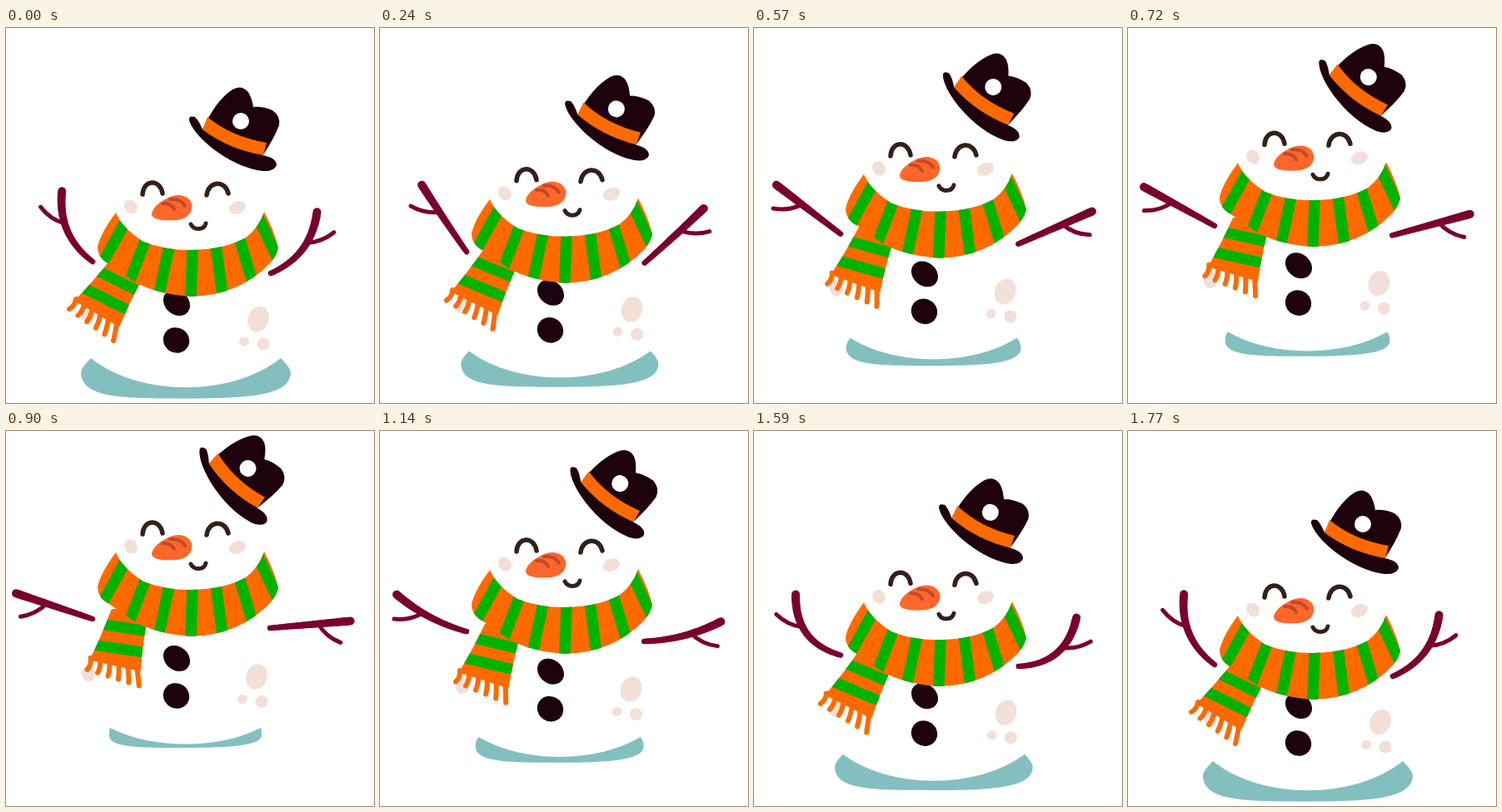
These frames come from a looping animation (442 by 451 pixels, 1.8 s). An HTML page with a canvas:

```html
<!DOCTYPE html>
<html lang="en">
<head>
<meta charset="utf-8">
<title>Snowman</title>
<style>
html, body { margin: 0; width: 100%; height: 100%; overflow: hidden; background: #fff; }
canvas { display: block; }
</style>
</head>
<body>
<canvas id="stage" width="442" height="451"></canvas>
<script>
const ctx = document.getElementById('stage').getContext('2d');
const LOOP = 1800, STEP = 30, RISE = 60, TOP = 900, LAND = 1770;
const ORANGE = '#ff6a00', GREEN = '#00b300', DARK = '#1e020d', BLUSH = '#f1dfd8',
      LINE = '#33201a', TWIG = '#7a002f', ICE = '#84bfc0', NOSE = '#ff672a', CREASE = '#c5482b';

const scarf = new Path2D(`M132 222 Q139 240 165 257 Q190 267 222 267 Q264 266 288 252
  Q304 240 310 221 Q323 246 327 264 Q326 272 318 282 Q280 322 222 323 Q180 320 154 305
  L124 284 Q110 277 110 263 Q114 246 132 222Z`);
const tail = new Path2D('M126 278 L170 290 Q152 322 136 360 L82 328 Q102 308 126 278Z');
const brim = new Path2D(`M220 111 Q219 105 227 107 Q232 112 236 122 Q268 146 308 153
  Q325 156 325 165 Q322 173 308 172 Q278 168 247 144 Q224 125 220 111Z`);
const crown = new Path2D(`M236 122 Q252 87 272 74 Q282 68 290 76 Q295 82 297 95
  Q308 94 320 99 Q330 106 328 117 Q322 133 308 154 Q268 146 236 122Z`);
const band = new Path2D('M242 107 Q271 131 313 138 L309 153 Q268 146 236 122Z');
const nose = new Path2D('M175 224 Q176 214 193 205 C208 197 222 202 223.5 214 Q223 228 206 231 Q176 233 175 224Z');

const lerp = (a, b, k) => a + (b - a) * k;
const radians = degrees => degrees * Math.PI / 180;

function fill(path, color) {
  ctx.fillStyle = color;
  ctx.fill(path);
}

function stroke(d, color, width) {
  ctx.strokeStyle = color;
  ctx.lineWidth = width;
  ctx.stroke(new Path2D(d));
}

function oval(x, y, rx, ry, color, tilt = 0) {
  ctx.fillStyle = color;
  ctx.beginPath();
  ctx.ellipse(x, y, rx, ry, tilt, 0, 7);
  ctx.fill();
}

function isolated(draw) {
  ctx.save();
  draw();
  ctx.restore();
}

function shifted(dy, draw) {
  isolated(() => {
    ctx.translate(0, dy);
    draw();
  });
}

function spin(x, y, degrees) {
  ctx.translate(x, y);
  ctx.rotate(radians(degrees));
  ctx.translate(-x, -y);
}

function ice(p) {
  const l = 90 + 34 * p, r = 342 - 35 * p, w = r - l, mid = (l + r) / 2;
  const lip = 12 - 11 * p, y = 397 - 40 * p;
  const side = y + 17 - 8 * p, low = y + 48.5 - 24.5 * p, dip = y + 47 - 21 * p;
  fill(new Path2D(`M${l + lip} ${y} Q${l} ${y + lip} ${l} ${side}
    C${l} ${low} ${l + 0.2 * w} ${low} ${mid} ${low}
    C${r - 0.2 * w} ${low} ${r} ${low - 3} ${r} ${side}
    Q${r} ${y + lip} ${r - lip} ${y}
    C${r - 0.28 * w} ${dip} ${l + 0.28 * w} ${dip} ${l + lip} ${y}Z`), ICE);
}

// Drawn upright from the shoulder, then leaned outwards; side is -1 (left) or 1.
function arm(x, y, side, lean, bend) {
  const length = 97 - 0.18 * bend, fork = radians(45 - 0.5 * bend);
  const at = k => [2 * k * (1 - k) * bend, -k * length];
  isolated(() => {
    ctx.translate(x, y);
    ctx.scale(side, 1);
    ctx.rotate(radians(lean));
    ctx.strokeStyle = TWIG;
    // Thickens towards the hand.
    for (let i = 0; i < 24; i++) {
      ctx.lineWidth = lerp(6.5, 10, i / 23);
      ctx.beginPath();
      ctx.moveTo(...at(i / 24));
      ctx.lineTo(...at((i + 1) / 24));
      ctx.stroke();
    }
    ctx.translate(...at(0.6));
    ctx.rotate(fork);
    stroke('M0 0Q6 -17 0 -35', TWIG, 5);
  });
}

function scarfTail(p) {
  isolated(() => {
    spin(165, 282, -18 * p);
    for (let k = 0; k <= 1; k += 0.2) {
      const x = lerp(84, 133, k), y = lerp(326, 355, k);
      stroke(`M${x} ${y}Q${x - 1} ${y + 8} ${lerp(76, 129, k)} ${lerp(338, 376, k)}`, ORANGE, 6);
    }
    fill(tail, ORANGE);
    ctx.clip(tail);
    for (let i = 0; i < 2; i++)
      stroke(`M${110 - 16 * i} ${292 + 21 * i}l48 24`, GREEN, 13);
  });
}

function mainScarf() {
  fill(scarf, ORANGE);
  isolated(() => {
    ctx.clip(scarf);
    // Bands fan out from the middle.
    for (let i = -3; i <= 3; i++) {
      const x = 224 + 28.5 * i, y = 267 - 2.8 * i * i, slope = 0.17 * i - 0.04;
      stroke(`M${x - 20 * slope} ${y - 20}l${90 * slope} 90`, GREEN, 13.5);
    }
  });
}

function face() {
  oval(150, 215, 7.5, 9, BLUSH, -0.6);
  oval(278, 216, 10.5, 7.5, BLUSH, -0.35);
  stroke('M164 200 C165 182 185 181 188 199', LINE, 5.5);
  stroke('M241 201 C243 184 263 182 267 199', LINE, 5.5);
  stroke('M222 236 C226 244 238 243 240 235', LINE, 5);
  fill(nose, NOSE);
  stroke('M188 211 Q198 210 202 218', CREASE, 4);
  stroke('M197 206 Q210 205 215 214', CREASE, 4);
}

function hat(p) {
  ctx.translate(0, 4 * p);
  spin(272, 139, 19.6 * p);
  fill(brim, DARK);
  fill(crown, DARK);
  fill(band, ORANGE);
  oval(282, 112, 10, 10, '#fff');
}

function draw(t) {
  const up = Math.max(0, (t - RISE) / (TOP - RISE));
  const down = Math.max(0, (t - TOP) / (LAND - TOP));
  const p = down ? Math.max(0, 1 - down) : up; // 0 squashed, 1 stretched
  // Arms straighten quickly on the way up and curl on the way down.
  const bend = down ? 35 * Math.sin(2.1 * down) ** 2 : 26 * Math.max(0, 1 - 4.5 * up);
  const lean = 48 * p + 5 * Math.sin(Math.PI * Math.min(1, down));

  ctx.clearRect(0, 0, 442, 451);
  ctx.lineCap = ctx.lineJoin = 'round';
  ice(p);
  arm(104, 281 - 55 * p, -1, 23.5 + lean, bend);
  arm(318 - p, 295 - 58 * p, 1, 37 + lean, bend);
  shifted(-57 * p, () => {
    oval(205, 330.5, 17.3, 14, DARK, 0.7);
    oval(204.5, 375.5, 16, 15, DARK, 0.6);
  });
  shifted(-54.5 * p, () => {
    const x = -2 * p;
    oval(303 + x, 350, 12.5, 15.5, BLUSH, 0.35);
    oval(286 + x, 377, 6, 5.5, BLUSH, -0.4);
    oval(309 + x, 380, 7.5, 7.5, BLUSH);
    oval(99, 346, 8, 10, BLUSH);
  });
  shifted(-76 * p, () => {
    scarfTail(p);
    mainScarf();
    face();
    hat(p);
  });
}

const start = performance.now();
function tick() {
  const t = (performance.now() - start) % LOOP;
  draw(Math.floor(t / STEP) * STEP);
  requestAnimationFrame(tick);
}
tick();
</script>
</body>
</html>
```
